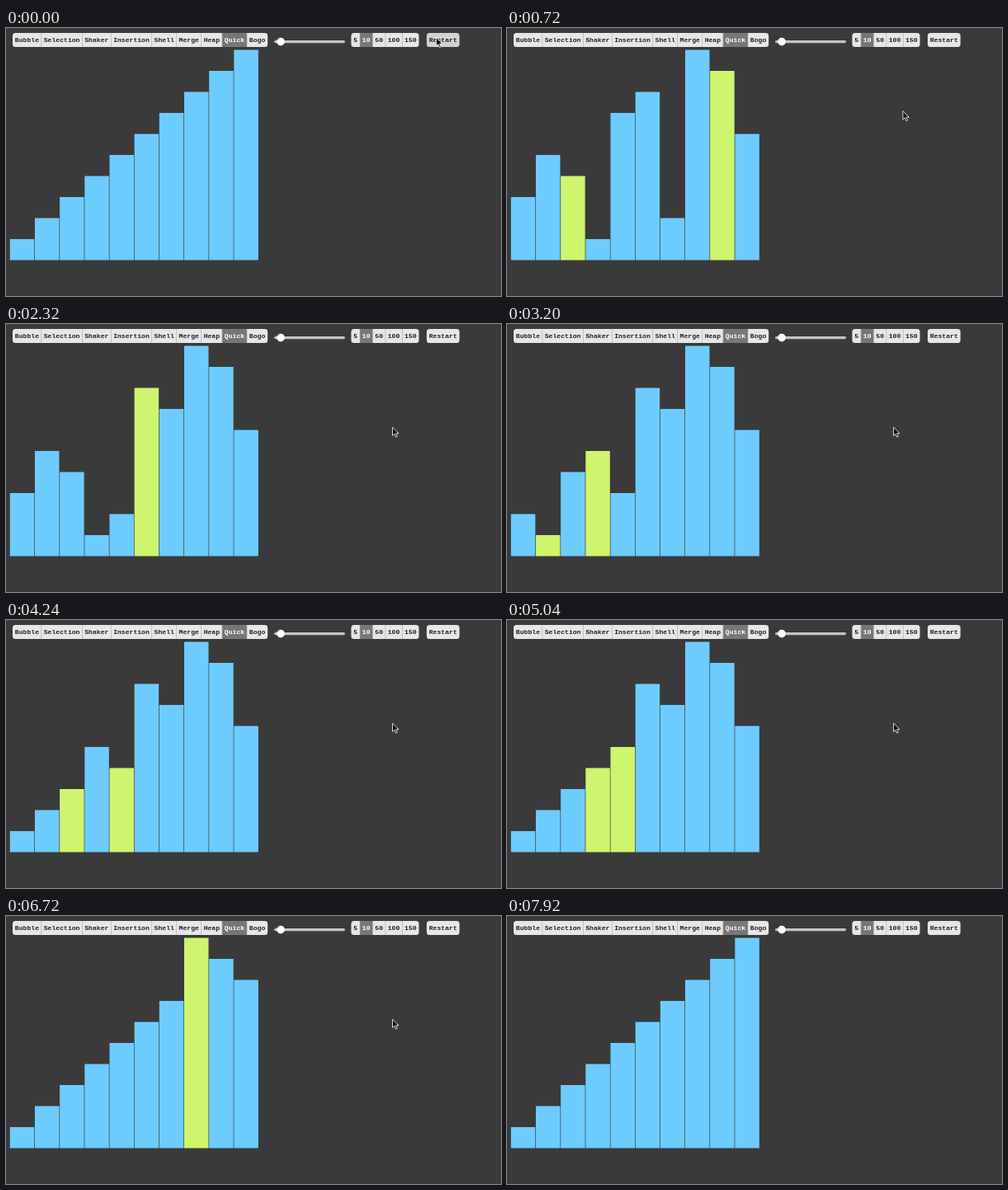
An HTML page for the animation above (8 s loop, 600x325 px).

```html
<!DOCTYPE html>
<html lang="en">
<head>
<meta charset="utf-8">
<title>Quick sort</title>
<style>
  html, body { margin: 0; width: 100%; height: 100%; overflow: hidden; background: #3a3a3a; }
  svg { display: block; width: 600px; height: 325px; }
  text { font: bold 8.1px "Courier New", "Liberation Mono", monospace; text-anchor: middle; }
</style>
</head>
<body>
<svg id="stage" viewBox="0 0 600 325"></svg>
<script>
const LOOP = 8000, SHUFFLE = 160, DONE = 7840;
const BLUE = '#6dccff', GREEN = '#cff56e';
const START = [6, 5, 4, 1, 7, 8, 2, 10, 9, 3];
// Moments at which each step of the sort appears
const TIMES = [160, 400, 640, 880, 1200, 1440, 1840, 2320, 2720, 3120, 3440, 3680,
  4240, 4560, 4880, 5280, 5680, 5920, 6320, 6800, 6960, 7200, 7520, 7680];

const stage = document.getElementById('stage');

function add(tag, attrs, text) {
  const el = document.createElementNS('http://www.w3.org/2000/svg', tag);
  for (const key in attrs) el.setAttribute(key, attrs[key]);
  if (text) el.textContent = text;
  stage.appendChild(el);
  return el;
}

// A row of joined buttons; returns its background
function buttons(x, labels, active) {
  const CHAR = 4.86, PAD = 5.73, TOP = 6, HEIGHT = 17;
  const widths = labels.map(s => s.length * CHAR + PAD);
  const total = widths.reduce((a, b) => a + b, 0);
  const back = add('rect', { x, y: TOP, width: total, height: HEIGHT, rx: 3.5, fill: '#e6e6e6' });
  labels.forEach((label, n) => {
    const on = label === active, w = widths[n];
    if (on) add('rect', { x, y: TOP, width: w, height: HEIGHT, fill: '#777' });
    if (n) add('rect', { x: x - 0.3, y: TOP, width: 0.6, height: HEIGHT, fill: '#aaa' });
    add('text', { x: x + w / 2, y: 17.2, fill: on ? '#fff' : '#222' }, label);
    x += w;
  });
  return back;
}

function quickSortSteps(values) {
  const a = values.slice(), steps = [];
  const show = (i, j) => steps.push({ values: a.slice(), i, j });
  (function sort(lo, hi) {
    if (lo >= hi) return;
    const pivot = a[lo];
    let i = lo, j = hi;
    while (i <= j) {
      while (a[i] < pivot) show(i++, j);
      while (a[j] > pivot) show(i, j--);
      if (i <= j) {
        [a[i], a[j]] = [a[j], a[i]];
        show(i++, j--);
      }
    }
    sort(lo, j);
    sort(i, hi);
  })(0, a.length - 1);
  return steps;
}

const steps = quickSortSteps(START);
const sorted = { values: START.slice().sort((a, b) => a - b), i: -1, j: -1 };

buttons(8, ['Bubble', 'Selection', 'Shaker', 'Insertion', 'Shell', 'Merge', 'Heap', 'Quick', 'Bogo'], 'Quick');
buttons(418.4, ['5', '10', '50', '100', '150'], '10');
const restart = buttons(509.9, ['Restart']);
add('rect', { x: 325, y: 15, width: 86, height: 3.2, rx: 1.6, fill: '#c4c4c4' });
add('circle', { cx: 333, cy: 16.6, r: 4.8, fill: '#fff' });

const bars = START.map((_, n) => add('rect', { x: 4.8 + 30.17 * n, width: 29.5 }));
const cursor = add('path', {
  d: 'M0 0V10.4L2.4 8.2L4 12L5.8 11.2L4.2 7.6H7.4Z',
  fill: '#111', stroke: '#fff', 'stroke-width': 0.8, 'stroke-linejoin': 'round'
});

function stepAt(t) {
  if (t < SHUFFLE || t >= DONE) return sorted;
  return steps[TIMES.filter(at => at <= t).length - 1];
}

function draw(t) {
  const { values, i, j } = stepAt(t);
  bars.forEach((bar, n) => {
    const h = values[n] * 25.5;
    bar.setAttribute('y', 281.5 - h);
    bar.setAttribute('height', h);
    bar.setAttribute('fill', n === i || n === j ? GREEN : BLUE);
  });

  const p = Math.min(1, Math.max(0, (t - SHUFFLE) / 800));
  const ease = p * p * (3 - 2 * p);
  const x = 521.5 - 53 * ease, y = 11.5 + 113.5 * ease;
  cursor.setAttribute('transform', `translate(${x} ${y})`);
  cursor.setAttribute('visibility', t < DONE ? 'visible' : 'hidden');
  restart.setAttribute('fill', t < DONE && y < 23 ? '#d2d2d2' : '#e6e6e6');
}

const began = performance.now();
function frame() {
  draw((performance.now() - began) % LOOP);
  requestAnimationFrame(frame);
}
frame();
</script>
</body>
</html>
```
